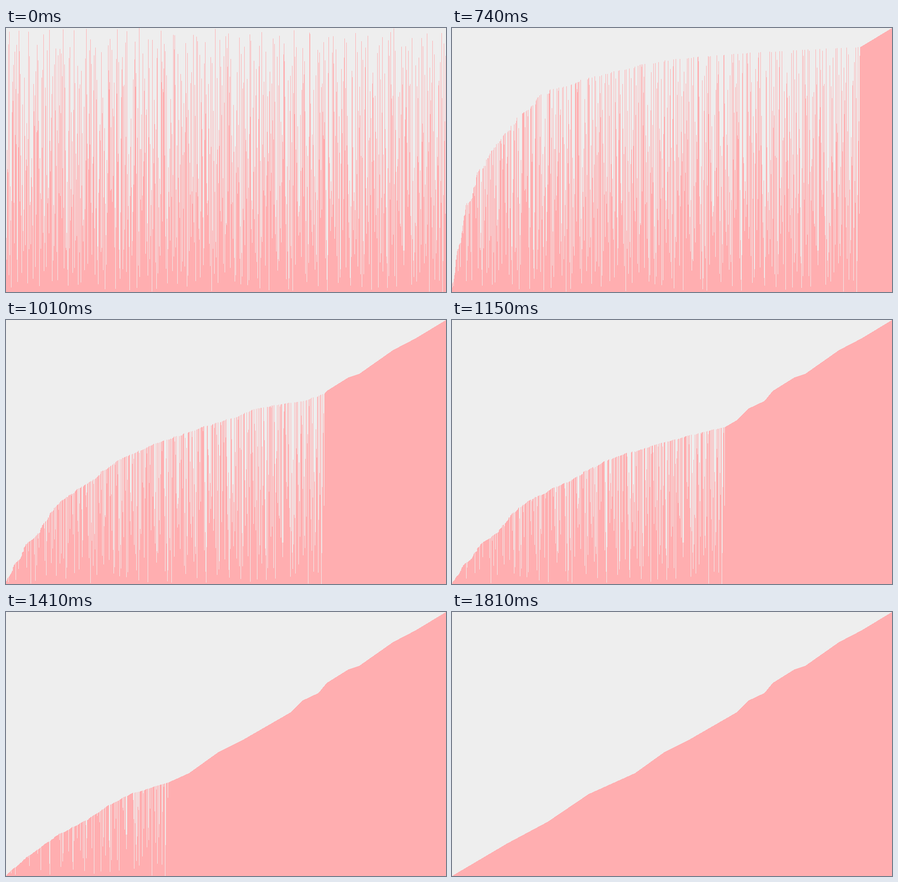
Write an HTML page with a canvas that moves like this. It is 966x580 px and loops after 1940 ms.

```html
<!DOCTYPE html>
<html lang="en">
<head>
<meta charset="utf-8">
<title>Bubble sort</title>
<style>
  html, body { margin: 0; width: 100%; height: 100%; overflow: hidden; background: #eee; }
  canvas { display: block; }
</style>
</head>
<body>
<canvas id="stage" width="966" height="580"></canvas>
<script>
const W = 966, H = 580;
const LOOP = 1940, START = 663, STEP = 67, LAST = 17;
const ctx = document.getElementById('stage').getContext('2d');

// Top edge of the sorted bars: x, y.
const outline = [
  [0, 580], [122, 508], [210, 461], [300, 400], [402, 354], [466, 308], [520, 281],
  [624, 221], [650, 195], [686, 178], [704, 156], [752, 126], [776, 118], [850, 66],
  [900, 40], [966, 0]
];

// Sorting speed: step, passes done.
const pace = [[0, 21], [5, 266], [7, 366], [9, 482], [16, 926], [LAST, W]];

function interpolate(points, x) {
  const i = Math.max(1, points.findIndex(p => p[0] >= x));
  const [x0, y0] = points[i - 1], [x1, y1] = points[i];
  return Math.round(y0 + (y1 - y0) * (x - x0) / (x1 - x0));
}

let seed = 7;
function random() {
  seed = (seed + 0x6D2B79F5) | 0;
  let t = Math.imul(seed ^ (seed >>> 15), 1 | seed);
  t = (t + Math.imul(t ^ (t >>> 7), 61 | t)) ^ t;
  return ((t ^ (t >>> 14)) >>> 0) / 4294967296;
}

function swap(list, a, b) {
  [list[a], list[b]] = [list[b], list[a]];
}

function shuffledRange(n) {
  const list = Array.from({ length: n }, (_, i) => i);
  for (let i = n - 1; i > 0; i--) swap(list, i, Math.floor(random() * (i + 1)));
  return list;
}

// Every block of columns gets one bar from each height class, in random order.
function makeBars() {
  const classes = 23, blocks = W / classes;
  const pools = Array.from({ length: classes }, () => shuffledRange(blocks));
  const bars = [];
  for (let b = 0; b < blocks; b++) {
    for (const c of shuffledRange(classes)) {
      const rank = c * blocks + pools[c][b];
      bars.push(H - interpolate(outline, rank + 0.5));
    }
  }
  return bars;
}

function bubblePass(bars, done) {
  for (let i = 0; i < W - 1 - done; i++) {
    if (bars[i] > bars[i + 1]) swap(bars, i, i + 1);
  }
}

function makeStates() {
  const bars = makeBars();
  const states = [bars.slice()];
  let done = 0;
  for (let k = 0; k <= LAST; k++) {
    const goal = interpolate(pace, k);
    while (done < goal) bubblePass(bars, done++);
    states.push(bars.slice());
  }
  return states;
}

const states = makeStates();
let shown = -1;

function draw(index) {
  ctx.fillStyle = '#eeeeee';
  ctx.fillRect(0, 0, W, H);
  ctx.fillStyle = '#ffaeb0';
  states[index].forEach((h, x) => ctx.fillRect(x, H - h, 1, h));
  shown = index;
}

function tick() {
  const t = performance.now() % LOOP;
  const k = Math.floor((t - START) / STEP);
  const index = Math.max(0, Math.min(LAST, k) + 1);
  if (index !== shown) draw(index);
  requestAnimationFrame(tick);
}
tick();
</script>
</body>
</html>
```
